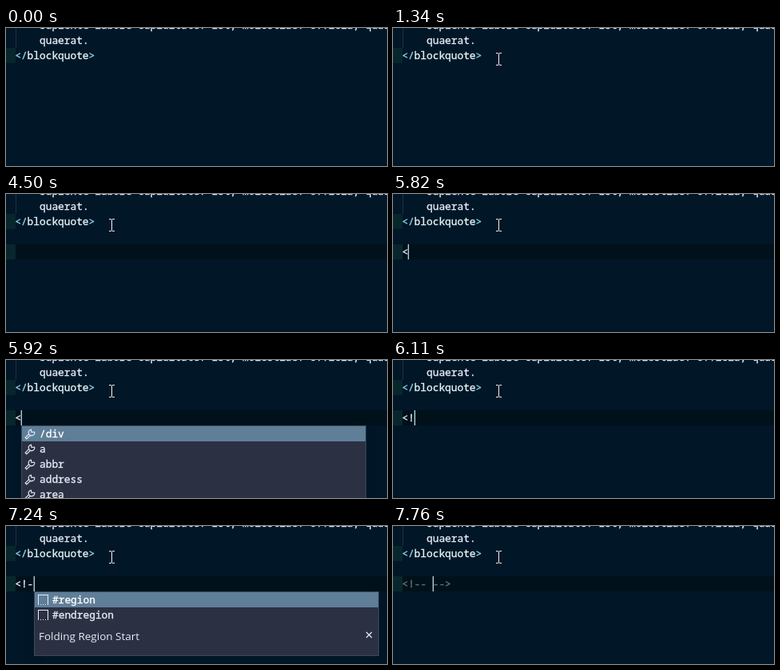
Write an HTML page with a canvas that moves like this. It is 477 by 173 pixels and loops after 8000 ms.

```html
<!DOCTYPE html>
<html lang="en">
<head>
<meta charset="utf-8">
<title>Typing a comment</title>
<style>
html, body { margin: 0; width: 100%; height: 100%; overflow: hidden; background: #011627; }
canvas { display: block; }
</style>
</head>
<body>
<canvas id="stage" width="477" height="173"></canvas>
<script>
const ctx = document.getElementById('stage').getContext('2d');
const W = 477, H = 173, LOOP = 8000;
const LEFT = 11.2, CHAR = 7.7, LINE = 19, TOP = 25;
const MONO = '12.833px "Noto Sans Mono", monospace';
const SANS = '13.5px "Open Sans", sans-serif';
const C = {
  bg: '#011627', row: '#01111b', gutter: '#08272c',
  guide: '#1c3444', guideOn: '#4f6a7c', text: '#e6ecf6', bracket: '#86d9e6',
  tag: '#e2f5f5', comment: '#637777', caret: '#b4cbde',
  popup: '#2c3043', border: '#3a4a5e', selected: '#5f7e97'
};

const colX = col => LEFT + col * CHAR;
const rowY = row => TOP + row * LINE;

function rect(x, y, w, h, color) {
  ctx.fillStyle = color;
  ctx.fillRect(x, y, w, h);
}

function text(str, x, baseline, color, font = MONO) {
  ctx.font = font;
  ctx.fillStyle = color;
  ctx.fillText(str, x, baseline);
  if (font === MONO) {
    // A hairline outline gives the code its sturdier weight.
    ctx.strokeStyle = color;
    ctx.lineWidth = 0.35;
    ctx.strokeText(str, x, baseline);
  }
}

const code = (str, col, row, color) => text(str, colX(col), rowY(row) + 14, color);

// Caret stops: [start, row, column, visible]
const carets = [
  [1560, 0, 13, 1], [2020, 0, 13, 0], [2520, 0, 13, 1],
  [3080, 1, 0, 1], [3560, 1, 0, 0],
  [4020, 2, 0, 1], [4500, 2, 0, 0], [4990, 2, 0, 1], [5470, 2, 0, 0],
  [5820, 2, 1, 1], [6020, 2, 2, 1], [6520, 2, 2, 0], [6980, 2, 2, 1],
  [7210, 2, 3, 1], [7460, 2, 4, 1], [7760, 2, 5, 1]
];

// Typed text: [start, string, color]
const typed = [
  [5820, '<', C.text], [6020, '<!', C.text], [7210, '<!-', C.text],
  [7460, '<!---->', C.comment], [7760, '<!-- -->', C.comment]
];

const latest = (list, t) => list.filter(item => item[0] <= t).pop();

function drawPage(t, activeRow) {
  rect(0, 0, W, H, C.bg);
  rect(0, rowY(0), 12, LINE, C.gutter);
  if (activeRow > 0) {
    rect(0, rowY(activeRow), 12, LINE, C.gutter);
    rect(12, rowY(activeRow), W - 12, LINE, C.row);
  }
  rect(12, 0, 1, TOP, t >= 1510 && t < 3080 ? C.guideOn : C.guide);
  code('sapiente labore cupiditate. Est, molestiae. Officia, quasi', 4, -2, C.text);
  code('quaerat.', 4, -1, C.text);
  code('</', 0, 0, C.bracket);
  code('blockquote', 2, 0, C.tag);
  code('>', 12, 0, C.bracket);
}

function wrench(x, y) {
  ctx.strokeStyle = C.text;
  ctx.lineWidth = 1.2;
  ctx.beginPath();
  ctx.arc(x + 9, y + 5, 3.8, -0.25, Math.PI * 1.4 + 0.15);
  ctx.lineTo(x + 9, y + 4.6);
  ctx.lineTo(x + 12.6, y + 4);
  ctx.moveTo(x + 5.8, y + 6.6);
  ctx.lineTo(x + 1.2, y + 11.2);
  ctx.lineTo(x + 2.8, y + 13);
  ctx.lineTo(x + 7.4, y + 8.6);
  ctx.stroke();
}

function snippet(x, y) {
  rect(x, y, 13, 1, C.text);
  rect(x, y, 1, 12, C.text);
  rect(x + 12, y, 1, 12, C.text);
  for (let i = 0; i < 13; i += 3) rect(x + i, y + 12, 1, 1, C.text);
}

function drawPopup(x, height, items, icon) {
  const y = rowY(3);
  ctx.save();
  ctx.shadowColor = C.bg;
  ctx.shadowBlur = 8;
  ctx.shadowOffsetY = 2;
  rect(x, y, 432, height, C.border);
  ctx.restore();
  rect(x + 1, y + 1, 430, height - 2, C.popup);
  rect(x + 1, y + 1, 430, LINE, C.selected);
  items.forEach((item, i) => {
    const top = y + 1 + i * LINE;
    icon(x + 4, top + 3);
    text(item, x + 23, top + 14, i ? C.text : '#ffffff');
  });
}

function drawRegionPopup() {
  drawPopup(35, 81, ['#region', '#endregion'], (x, y) => snippet(x + 1, y));
  text('Folding Region Start', 41, 143, C.text, SANS);
  ctx.strokeStyle = C.text;
  ctx.lineWidth = 1.2;
  ctx.beginPath();
  ctx.moveTo(451, 133);
  ctx.lineTo(458, 140);
  ctx.moveTo(458, 133);
  ctx.lineTo(451, 140);
  ctx.stroke();
}

function drawMouse(t) {
  if (t < 580) return;
  const p = Math.min(1, (t - 580) / 760);
  const rest = (1 - p) ** 3;
  const x = Math.round(132 + 243 * rest);
  const y = Math.round(39 + 152 * rest - 19 * rest * rest);
  rect(x, y - 7, 1, 14, '#f4f6f8');
  for (const dy of [-8, 7]) {
    rect(x - 3, y + dy, 3, 1, '#f4f6f8');
    rect(x + 1, y + dy, 3, 1, '#f4f6f8');
  }
  if (t >= 1510 && t < 1610) {
    ctx.strokeStyle = 'rgba(214, 222, 235, 0.35)';
    ctx.lineWidth = 1;
    ctx.beginPath();
    ctx.arc(x, y, t < 1560 ? 6 : 10, 0, Math.PI * 2);
    ctx.stroke();
  }
}

function draw(t) {
  const caret = latest(carets, t);
  const line = latest(typed, t);
  drawPage(t, caret ? caret[1] : 0);
  if (line) code(line[1], 0, 2, line[2]);
  if (t >= 5850 && t < 6110) {
    drawPopup(19, 120, ['/div', 'a', 'abbr', 'address', 'area'], wrench);
  }
  if (t >= 7240 && t < 7460) drawRegionPopup();
  if (caret && caret[3]) {
    rect(Math.floor(colX(caret[2])) + 0.6, rowY(caret[1]), 1.4, LINE, C.caret);
  }
  drawMouse(t);
}

const start = performance.now();
function tick() {
  draw((performance.now() - start) % LOOP);
  requestAnimationFrame(tick);
}
tick();
</script>
</body>
</html>
```
